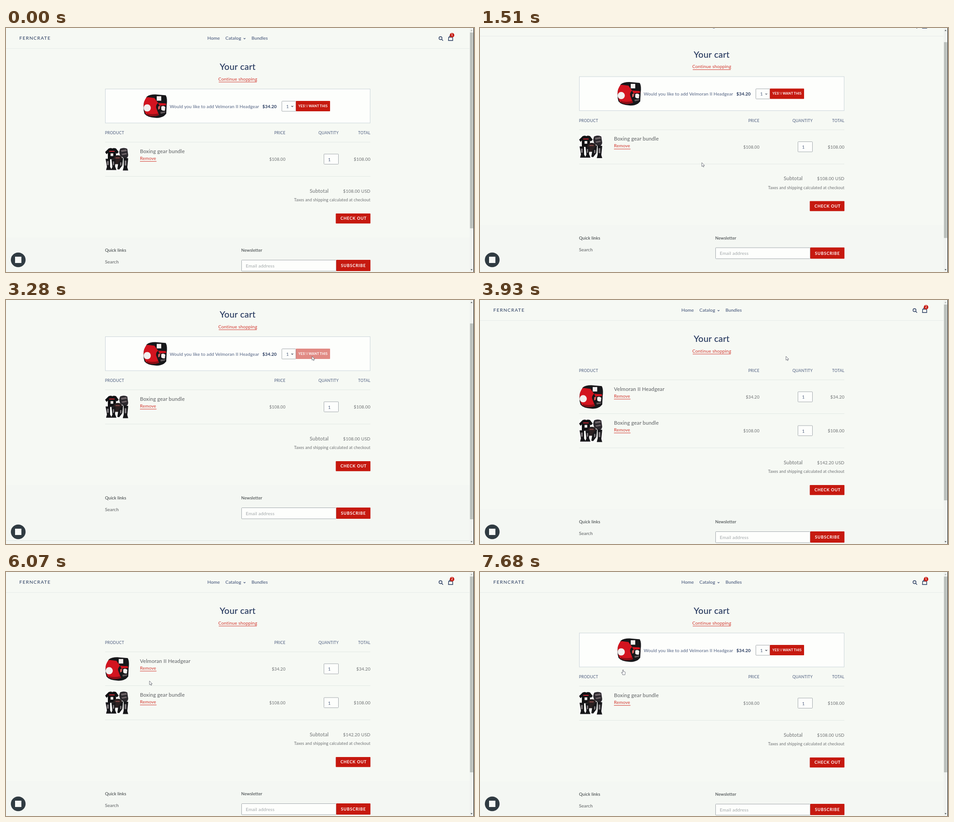
These frames come from a looping animation (1034 by 542 pixels, 8000 ms). An HTML page:

```html
<!DOCTYPE html>
<html lang="en">
<head>
<meta charset="utf-8">
<title>Cart</title>
<style>
html, body { margin: 0; width: 100%; height: 100%; overflow: hidden; background: #f6f9f4; }
svg { display: block; width: 1034px; height: 542px; }
text { font-family: Lato, "Open Sans", sans-serif; letter-spacing: .02em; white-space: pre; }
.mid { paint-order: stroke; stroke-width: .15px; }
.bold { font-weight: 700; }
.end { text-anchor: end; }
.center { text-anchor: middle; }
</style>
</head>
<body>
<svg id="stage" viewBox="0 0 1034 542" xmlns="http://www.w3.org/2000/svg">
  <defs>
    <g id="headgear">
      <path fill="#17171a" d="M8 5Q14 0 27 0L50 2Q54 9 52 24L51 43L46 48Q38 53 27 52Q9 51 3 43Q-1 30 2 17Z"/>
      <path fill="#d3141f" d="M2 17Q5 8 9 6L25 8L33 19Q26 25 30 33L35 46Q19 52 6 44Q-1 30 2 17Z"/>
      <path fill="#d3141f" d="M33 19L50 20L51 24L36 25Z"/>
      <path fill="#cf5a58" d="M33 27L38 25L37 32L33 34Z"/>
      <path fill="#f5efed" d="M40 27Q45 24 49 28L48 36Q43 37 40 34Z"/>
      <path fill="#60585b" d="M38 39L49 38L48 41L39 43Z"/>
      <path fill="#8c0d15" d="M8 42Q20 46 34 42L35 46Q19 52 8 45Z"/>
      <circle cx="9" cy="30" r="8" fill="#f3efee"/>
      <rect x="30" y="4" width="10" height="10" fill="#f3efee"/>
    </g>
    <g id="bundle">
      <rect width="51" height="52" fill="#fcfdfb"/>
      <path fill="#121214" d="M8 2L13 1Q16 3 19 1L24 2L30 10L26 14L24 12V26H6V12L3 15L0 10Z"/>
      <path fill="#c22531" d="M9 7.5H21V9.5H9Z"/>
      <rect x="12" y="13" width="6" height="6" fill="#e9e6e4"/>
      <path fill="#2b282d" d="M33 3Q42-1 49 3L51 17Q50 25 42 24L33 18L31 10Z"/>
      <path fill="#6c6266" d="M35 6L47 4L48 8L36 10ZM36 14L47 12L48 15L38 17Z"/>
      <path fill="#2a2021" d="M18 29Q17 18 27 17Q38 17 38 27L34 37H22Z"/>
      <path fill="#8c4b49" d="M23 22H32V24H23Z"/>
      <path fill="#17171a" d="M1 25H11L11 43L15 50H2L4 43ZM14 26H23L22 42L25 50H13L16 43ZM29 34L36 25L40 22L38 40L31 49L27 48ZM41 22L51 24L49 44L51 51H39L41 43Z"/>
      <path fill="#7d787c" d="M4 30H8V39H4ZM17 31H20V39H17ZM33 33H36V40H33ZM43 29H47V40H43Z"/>
    </g>
  </defs>
  <g id="page"></g>
  <g id="bubble">
    <circle cx="27" cy="515" r="16.3" fill="#303b42"/>
    <rect x="20" y="508" width="14" height="14" fill="#f6f8f6"/>
  </g>
  <g id="bar">
    <rect x="1024.5" width="8.5" height="542" fill="#eff2ef"/>
    <rect id="thumb" x="1025" y="10" width="7.2" height="435" fill="#bcc1bd"/>
    <path id="up" d="M1026.4 6.5h4.4l-2.2-2.6z"/>
    <path d="M1026.4 535.8h4.4l-2.2 2.6z" fill="#4d5254"/>
    <rect x="1033" width="1" height="542"/>
  </g>
  <g id="cursor" stroke="#555964" stroke-width=".8" stroke-linejoin="round" fill="#fff">
    <path id="arrow" d="M0 0V8.6L2 6.9L3.4 9.8L4.8 9.2L3.5 6.4H6.2Z"/>
    <path id="hand" d="M-.9.8Q0-.5.9.8V4.2L4.6 5Q5.3 5.4 5.2 6.4L4.4 9.6V11.3H-1V10L-3.6 6.6Q-3.6 5.4-2.4 5.9L-.9 7.2Z"/>
  </g>
</svg>
<script>
const LOOP = 8000, RED = '#c6190f', NAVY = '#24375c', BLUE = '#4f5f80', GREY = '#6d7072', LINK = '#d2352c';
const ITEM = 'Velmoran II Headgear';
const $ = id => document.getElementById(id);

const text = (x, y, size, str, fill, cls = '', more = '') =>
  `<text x="${x}" y="${y}" font-size="${size}" fill="${fill}" stroke="${/mid/.test(cls) ? fill : 'none'}" class="${cls}" ${more}>${str}</text>`;
const rect = (x, y, w, h, fill, more = '') =>
  `<rect x="${x}" y="${y}" width="${w}" height="${h}" fill="${fill}" ${more}/>`;
const line = (x1, x2, y, color = '#e2e8e4') =>
  `<path d="M${x1} ${y}H${x2}" stroke="${color}" fill="none"/>`;
const chevron = (x, y, color) =>
  `<path d="M${x - 2} ${y - 1}l2 2l2-2" fill="none" stroke="${color}" stroke-width="1.1"/>`;
const field = (x, y, w, h) => rect(x, y, w, h, '#fdfefc', 'stroke="#a3a9ad" rx="1"');
const spaced = px => `style="letter-spacing:${px}px"`;

function header(count) {
  return text(29.5, 25.6, 10.4, 'FERNCRATE', NAVY, '', spaced(1.25)) +
    text(445, 26, 10, 'Home', BLUE, 'mid') +
    text(484.8, 26, 10, 'Catalog', BLUE, 'mid') + chevron(527, 23.5, BLUE) +
    text(542.6, 26, 9.8, 'Bundles', BLUE, 'mid') +
    `<g fill="none" stroke="${NAVY}" stroke-width="1.4"><circle cx="960" cy="22.5" r="3.3"/>
     <path d="M962.4 25l3.2 3.2M978 20.5h8.6l.5 7.3h-9.6zM980 20.5q0-3.5 2.3-3.5t2.3 3.5"/></g>
     <circle cx="985.5" cy="16" r="5" fill="${RED}"/>` +
    text(985.5, 18.4, 6.5, count, '#fff', 'bold center') +
    line(0, 1024, 45.5, '#e6ece8') +
    text(512, 93, 19.3, 'Your cart', '#20335a', 'mid center') +
    text(512, 116.8, 10, 'Continue shopping', LINK, 'center') + line(470, 554, 120, LINK);
}

function offer() {
  return rect(219.5, 135.5, 585, 75.5, '#fdfefc', 'stroke="#cbd5da"') +
    '<use href="#headgear" x="303" y="147.5"/>' +
    text(361.7, 177.5, 9.85, 'Would you like to add ' + ITEM, BLUE) +
    text(566.5, 177.5, 9.7, '$34.20', NAVY, 'bold') +
    field(609.5, 162.5, 31, 22.5) + text(619, 177.8, 10, '1', BLUE) + chevron(632.5, 174, '#3e4655') +
    `<g id="yes">${rect(640.5, 162, 75.5, 23, RED, 'rx="1"')}</g>` +
    text(646, 175.6, 7.3, 'YES! I WANT THIS', '#fff', 'bold', spaced(.25));
}

function heads(y) {
  return text(218.7, y, 8.6, 'PRODUCT', BLUE) + text(617.3, y, 8.6, 'PRICE', BLUE, 'end') +
    text(735, y, 8.6, 'QUANTITY', BLUE, 'end') + text(805, y, 8.6, 'TOTAL', BLUE, 'end');
}

function row(y, art, name, price) {
  return line(219, 805, y) + `<use href="#${art}" x="219" y="${y + 12}"/>` +
    text(296, y + 24.2, 11.3, name, GREY, 'mid') +
    text(296, y + 39.3, 9.8, 'Remove', LINK) + line(296, 332.5, y + 42.8, LINK) +
    text(617.5, y + 41.7, 9.3, price, GREY, 'end') +
    field(702.5, y + 26.5, 32, 22.5) + text(711.5, y + 42, 10, '1', BLUE) +
    text(805.3, y + 41.7, 9.6, price, GREY, 'end');
}

function footer(dy, total) {
  return `<g transform="translate(0 ${dy})">` + line(219, 805, 329.5) +
    text(671, 365.8, 11, 'Subtotal', GREY) + text(805.2, 365.8, 9.7, total + ' USD', GREY, 'end') +
    text(805.2, 385, 8.85, 'Taxes and shipping calculated at checkout', GREY, 'end') +
    rect(728.6, 412, 76.6, 22.2, RED, 'rx="1"') +
    text(739, 426.4, 9, 'CHECK OUT', '#fff', 'bold', spaced(.7)) +
    rect(0, 465, 1025, 240, '#f4f7f3') +
    text(218.7, 497, 9.35, 'Quick links', '#4b5052', 'mid') + text(218.7, 523.3, 10, 'Search', GREY, 'mid') +
    text(519.8, 497, 9.2, 'Newsletter', '#4b5052', 'mid') +
    field(520.5, 515.5, 209, 24.5) + text(529.8, 531.5, 10.2, 'Email address', '#a2a7aa') +
    rect(729.6, 515, 75.6, 25, RED, 'rx="1"') +
    text(740, 531, 9, 'SUBSCRIBE', '#fff', 'bold', spaced(.8)) +
    line(0, 1024, 588.5, '#e0e6e2') + '</g>';
}

$('page').innerHTML =
  `<g id="single">${header(1)}${offer()}${heads(236)}${row(253.5, 'bundle', 'Boxing gear bundle', '$108.00')}${footer(0, '$108.00')}</g>` +
  `<g id="double">${header(2)}${heads(159.5)}${row(177.3, 'headgear', ITEM, '$34.20')}${row(252.5, 'bundle', 'Boxing gear bundle', '$108.00')}${footer(-1, '$142.20')}</g>`;

// time, x, y of the pointer tip
const PATH = [
  [140, 540, 530], [490, 497, 312], [770, 497, 312], [870, 490, 299], [1600, 490, 299],
  [2220, 675, 133], [2480, 676, 125], [5630, 676, 125], [6070, 317, 242], [6330, 316, 217]
];
// time, scroll offset
const SCROLL = [[1420, 0], [1600, 54], [3929, 54], [3930, 0]];
// time, button opacity
const FADE = [[3060, 1], [3280, .5]];

const ease = p => p * p * (3 - 2 * p);
function at(keys, t) {
  if (t <= keys[0][0]) return keys[0].slice(1);
  for (let i = 1; i < keys.length; i++) {
    const a = keys[i - 1], b = keys[i];
    if (t < b[0]) {
      const p = ease((t - a[0]) / (b[0] - a[0]));
      return a.slice(1).map((v, k) => v + (b[k + 1] - v) * p);
    }
  }
  return keys[keys.length - 1].slice(1);
}
const show = (id, on) => $(id).setAttribute('display', on ? 'inline' : 'none');

function draw(now) {
  const t = now % LOOP;
  const two = t >= 3930 && t < 7680;
  const [scroll] = at(SCROLL, t);
  const [x, y] = at(PATH, t);
  const hand = (t > 2250 && t < 3080) || t > 6230;
  show('single', !two);
  show('double', two);
  $('page').setAttribute('transform', `translate(0 ${-scroll})`);
  $('thumb').setAttribute('y', 10 + scroll * .78);
  $('up').setAttribute('fill', scroll > 0 ? '#4d5254' : '#a9aeaa');
  $('yes').setAttribute('opacity', t < 7680 ? at(FADE, t)[0] : 1);
  show('cursor', t >= 140);
  $('cursor').setAttribute('transform', `translate(${x} ${y})`);
  show('hand', hand);
  show('arrow', !hand);
}

const start = performance.now();
function tick() {
  draw(performance.now() - start);
  requestAnimationFrame(tick);
}
tick();
</script>
</body>
</html>
```
